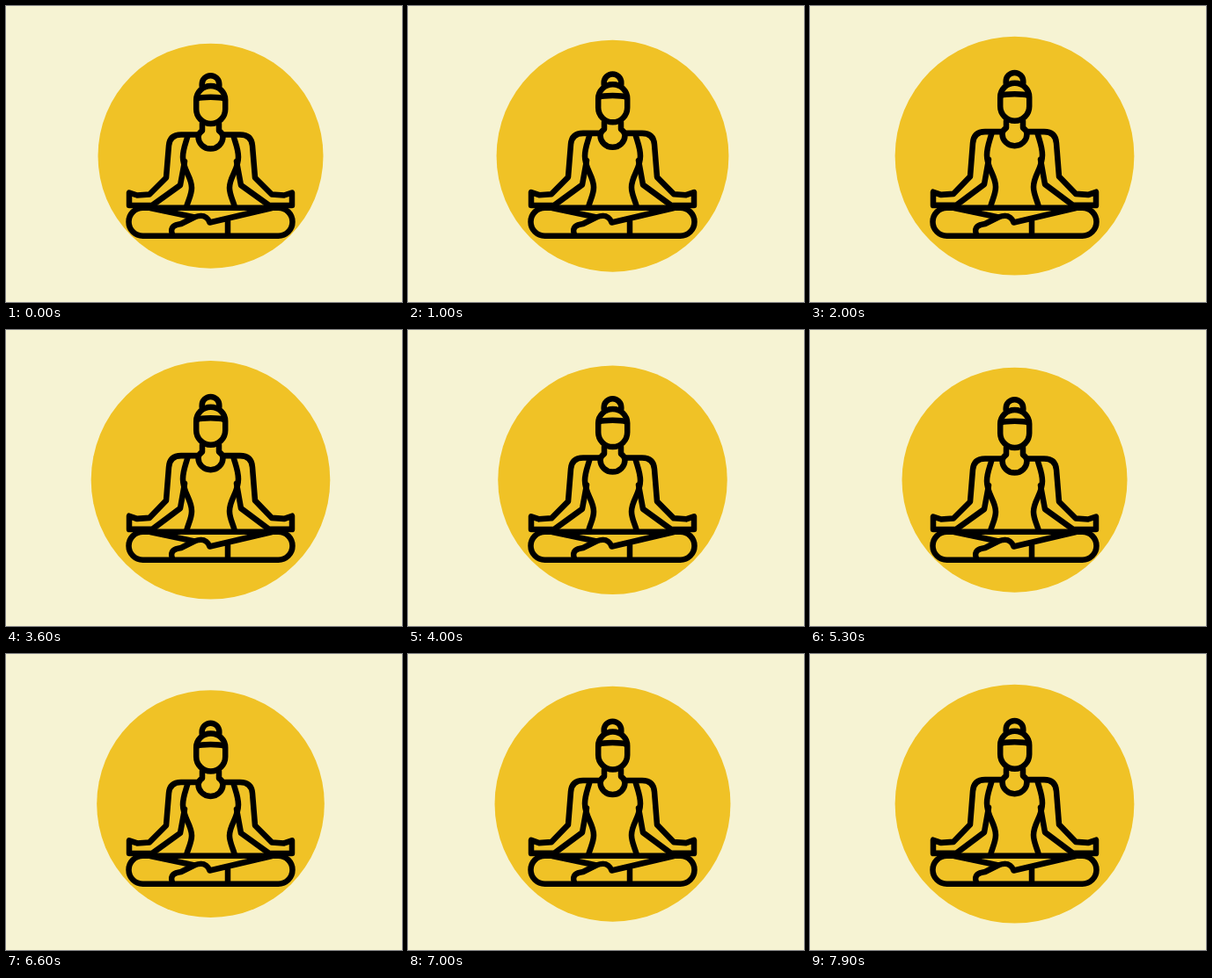
An HTML page that plays this animation: 450x337 px, repeating every 8000 ms.

```html
<!DOCTYPE html>
<html lang="en">
<head>
<meta charset="utf-8">
<title>Breathing meditation</title>
<style>
  /* 0 = breathed out, 1 = breathed in */
  @property --breath { syntax: "<number>"; inherits: true; initial-value: 0; }

  html, body { margin: 0; width: 100%; height: 100%; overflow: hidden; background: #f6f3d3; }
  svg { display: block; width: 100%; height: 100%; animation: breathe 8s infinite; }

  .disc {
    fill: #f0c226;
    transform-origin: 232.5px 170.7px;
    transform: scale(calc(1 + .0615 * var(--breath)));
  }
  .lines { fill: none; stroke: #000; stroke-width: 6.5; stroke-linecap: round; stroke-linejoin: round; }
  .head { transform: translateY(calc(-3.3px * var(--breath))); }
  .torso {
    transform-origin: 232.5px 229px;
    transform: scaleY(calc(1 + .04 * var(--breath)));
  }

  @keyframes breathe {
    0%, 6.25%, 55.625%, 79.125% { --breath: 0; animation-timing-function: cubic-bezier(.37, 0, .63, 1); }
    18.75%, 44.375%, 91.625%, 100% { --breath: 1; animation-timing-function: cubic-bezier(.4, 0, .3, 1); }
  }
</style>
</head>
<body>
<svg viewBox="0 0 450 337" preserveAspectRatio="none">
  <defs>
    <g id="half">
      <path d="M219 146.500 H199 Q186 146.500 185 159 L182 195.500 L163 214.500 L149 215.500 L140 212.500 V227 H166 L198 204 L203 177"/>
      <path d="M206.500 148 C204 157 201 163 201 172 C201 187 211 194 211 207 C211 215 207 221 205 229"/>
    </g>
  </defs>
  <circle class="disc" cx="232.5" cy="170.7" r="128"/>
  <g class="lines">
    <g class="head">
      <path d="M222.700 91 V89 a9.800 9.800 0 0 1 19.600 0 V91"/>
      <path d="M216.200 107 a16.500 16 0 0 1 33 0 V117.500 a16.500 16.500 0 0 1 -33 0 Z"/>
      <path d="M217 105.500 C222 103 243 103 248 105.500"/>
      <path d="M223 134 V142 Q218.500 145 218.500 149 a14 13.500 0 0 0 28 0 Q246.500 145 242 142 V134"/>
    </g>
    <g class="torso">
      <use href="#half"/>
      <use href="#half" transform="translate(465 0) scale(-1 1)"/>
    </g>
    <rect x="139.500" y="229.700" width="186" height="32" rx="16"/>
    <path d="M164 230 L214 240.500 M302 230 L231.500 246.500 C228 238 222 237.500 214 240.500 L199 248 C191 249 186 252 189 260 M252 244 V261"/>
  </g>
</svg>
</body>
</html>
```
